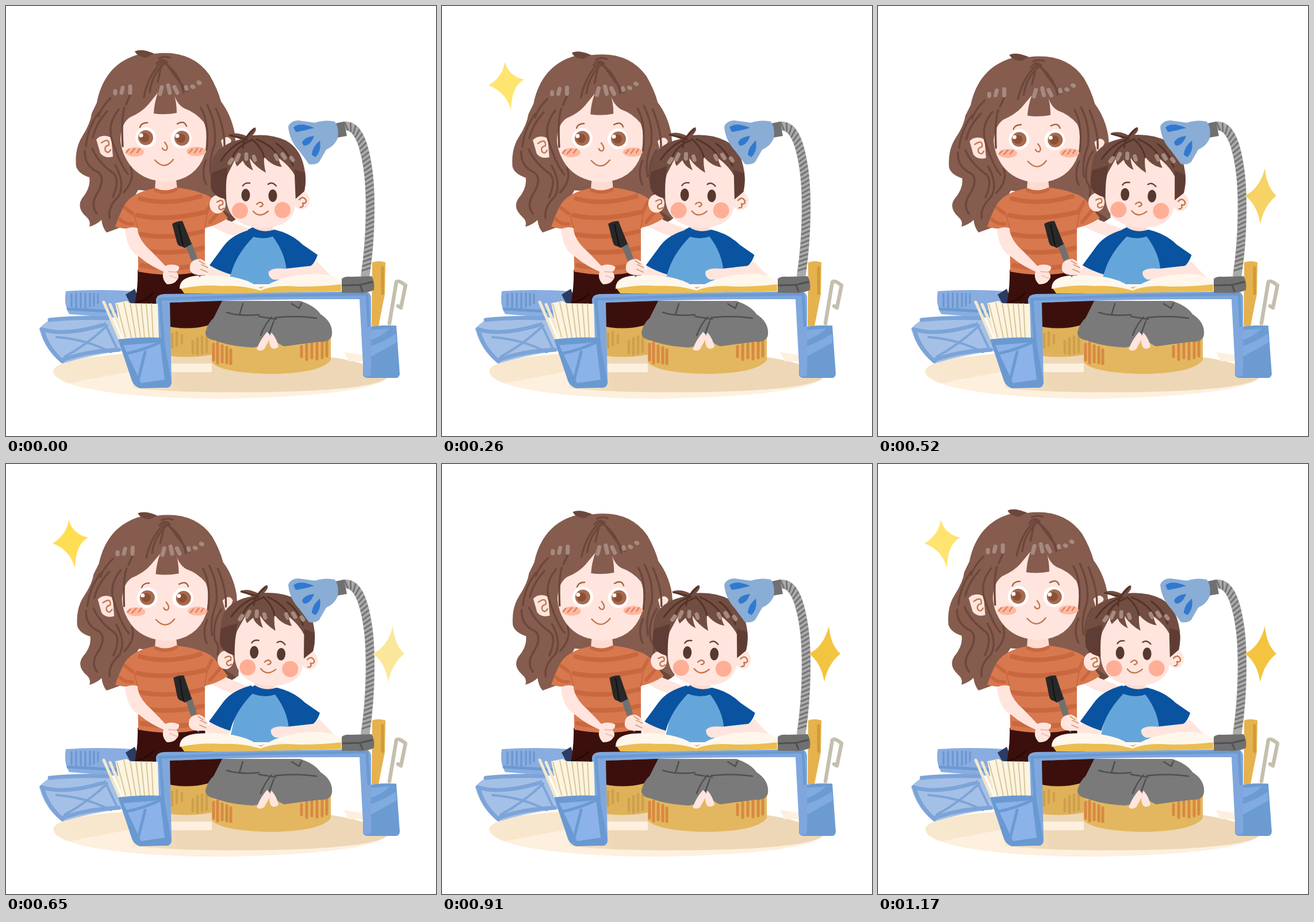
Recreate the animation shown at these times as an HTML page. Size 748x748 px, loop 1300 ms.

```html
<!DOCTYPE html>
<html lang="en">
<head>
<meta charset="utf-8">
<title>Homework together</title>
<style>
html, body { margin: 0; height: 100%; overflow: hidden; background: #fff; }
svg { display: block; width: 100vw; height: 100vh; }
.line { fill: none; stroke-linecap: round; stroke-linejoin: round; }
.hair { stroke: #6c473b; stroke-width: 3.4; }
.face { stroke: #c4764c; stroke-width: 2.4; }
.skin { fill: #ffe5de; }
.blue { stroke: #6b9ad1; stroke-width: 5; }
.bag { stroke: #7ca4d8; }
.shine { stroke: #a58a80; stroke-width: 7; }
</style>
</head>
<body>
<svg viewBox="0 0 748 748">
  <!-- floor -->
  <linearGradient id="sand">
    <stop offset="0" stop-color="#f8e8cf"/><stop offset=".25" stop-color="#f7e6cb"/><stop offset=".38" stop-color="#edd7b6"/>
  </linearGradient>
  <path fill="#fef0de" d="M82 636C86 612 190 600 350 600S650 615 661 648C640 672 480 683 360 683S84 668 82 636Z"/>
  <path fill="url(#sand)" d="M82 634C90 612 180 603 350 601S640 612 662 648C640 664 540 672 400 672C300 672 230 668 190 660L110 656Q84 648 82 634Z"/>
  <path fill="#fef0de" d="M286 622H358V637H288ZM110 656L215 636L222 664ZM588 602L621 607V618H596Z"/>

  <!-- right-hand stationery -->
  <path fill="#e6b24e" d="M637 446Q648 442 660 446L659 501L648 557H636Z"/>
  <path class="line" stroke="#cf9938" stroke-width="5" d="M655 455V500"/>
  <path class="line" stroke="#c4bfad" stroke-width="6.5" d="M667 552L679 480Q683 476 695 486L687 525L682 522"/>
  <path fill="#6c9bd2" d="M622 560Q650 554 679 556L685 640Q684 648 676 647H628Q620 646 621 638Z"/>
  <path fill="#80abe0" d="M627 564L668 561Q650 578 627 583ZM627 594Q655 586 678 570L680 585L627 614Z"/>

  <!-- books and bag -->
  <path fill="#89ade0" d="M104 496Q160 492 222 496L228 522L226 545L110 536Q100 520 104 496Z"/>
  <path class="line" stroke="#6a95d0" stroke-width="3" d="M114 501V522M122 500V525M130 500V524M138 500V526M146 500V523M153 500V521M160 501V517"/>
  <path class="line blue" d="M108 527L195 532"/>
  <path fill="#a5c0e6" d="M58 562Q62 555 76 546Q120 540 180 541L205 600Q150 606 98 622Q68 600 58 562Z"/>
  <path class="line bag" stroke-width="7" d="M62 562Q100 575 168 555M76 546Q120 541 178 543M98 616Q140 600 196 598M64 566Q72 595 98 618"/>
  <path class="line bag" stroke-width="4" d="M88 576Q140 580 182 602M176 556Q140 590 102 610M172 552L192 594"/>

  <!-- rear cushion -->
  <path fill="#dfb25a" d="M276 555H360V606Q320 614 280 608Z"/>
  <path class="line" stroke="#cf9f4c" stroke-width="4.5" d="M289 570V594M297 568V590M306 573V586M325 583V604M333 578V606M341 575V604M349 576V602"/>

  <!-- parent: hair mass and ears -->
  <g class="sway">
    <path fill="#855c4e" d="M224 79Q236 73 258 83Q322 75 354 120Q368 144 374 166Q392 190 398 222L406 300L404 368L392 376L345 330L230 320L222 334L202 384Q184 391 175 394Q168 386 166 372Q158 380 145 384Q148 374 140 367Q122 351 132 335Q148 316 145 298Q126 292 122 279Q119 248 133 226Q147 204 149 187L158 168C164 138 180 98 231 84Z"/>
    <path fill="#6c473b" d="M224 79Q236 74 257 83L244 90Q228 88 224 79ZM358 342L396 367L400 371L389 377Z"/>
    <path class="skin" d="M157 232Q168 221 183 229L186 262Q172 266 164 256Z"/>
    <path class="line face" d="M166 238Q180 228 179 242Q170 244 173 252Q178 258 182 250"/>
    <path class="skin" d="M374 234Q386 222 392 234L382 262Z"/>
    <path class="line hair" d="M161 186Q142 212 139 244M176 183Q156 205 151 229M196 180Q176 205 184 232Q198 276 212 292M182 160Q165 177 161 192M137 252Q136 278 160 289Q173 298 161 322Q145 345 158 361M190 277Q208 308 196 331Q177 349 180 369M217 281Q225 302 205 324M150 248Q160 272 188 292Q198 304 186 332M365 178Q381 215 380 245M350 172Q367 205 363 240Q352 270 357 296M372 250Q356 275 362 305Q371 315 367 330M348 268Q339 290 348 310"/>
  </g>

  <!-- parent: body -->
  <path fill="#2c3c62" d="M208 502L224 492L235 520L219 523Z"/>
  <path fill="#3b100c" d="M229 459L346 458L348 490L382 518Q374 546 350 556Q312 566 268 554L224 518Q230 488 229 459Z"/>
  <path class="line" stroke="#260806" stroke-width="2.5" d="M256 500Q243 513 226 516M300 506Q330 512 364 508"/>
  <path class="skin" d="M356 381L382 371Q406 381 432 391L414 403Q380 398 356 381Z"/>
  <path fill="#fddbd0" d="M261 292H295L298 320Q278 328 259 319Z"/>
  <path fill="#d8784e" d="M258 317Q276 325 297 316Q325 319 338 325Q358 330 367 344L386 369Q366 382 346 386V460Q290 474 230 462L229 386Q212 390 190 384Q200 355 209 342Q222 324 258 317Z"/>
  <path class="line" stroke="#c9683f" stroke-width="8" d="M233 335Q280 348 338 331M229 364Q275 375 345 359M234 397Q285 407 342 392M235 425Q290 434 342 421M236 451Q290 462 341 449"/>
  <path class="line" stroke="#c9683f" stroke-width="6" d="M207 351L220 361M198 371Q207 380 220 379M358 341L348 360M373 355L355 376M260 320Q278 328 296 319"/>
  <path class="line" stroke="#c9683f" stroke-width="2" d="M229 386L222 360M346 386L350 360"/>
  <path class="skin" d="M207 388Q218 383 228 386Q231 408 252 426Q266 440 277 452Q290 447 301 453Q302 460 296 462Q303 470 298 476Q292 485 280 484Q270 475 274 462Q250 452 230 435Q210 424 207 388Z"/>
  <path class="line" stroke="#efb9a6" stroke-width="1.8" d="M283 462L296 463M285 469L298 474"/>

  <!-- parent: face -->
  <g class="sway">
    <path class="skin" d="M199 232Q200 205 215 194Q236 185 247 172L264 151Q258 168 257 187Q276 190 297 186Q297 166 291 150Q297 171 310 178Q330 185 344 202Q353 222 346 257Q331 303 278 306Q225 303 206 260Q200 247 199 232Z"/>
    <path class="line hair" d="M272 97Q248 118 240 158M276 99Q253 120 250 150M272 97Q300 113 309 150M278 99Q301 132 315 148M262 101Q270 89 280 98M285 90Q275 86 266 91M270 104L264 132M206 177Q200 198 203 244M339 177Q354 204 349 250M218 150L209 171"/>
    <path class="line shine" d="M190 148V152M203 142L201 151M216 140V151M271 141L268 153M282 138L285 151M293 141L298 151M313 141L314 144M324 140L326 141M335 133L337 134"/>
    <circle cx="243" cy="229" r="18" fill="#fff"/><circle cx="305" cy="230" r="18" fill="#fff"/>
    <g fill="#a86a4d"><circle cx="243" cy="229" r="13"/><circle cx="306" cy="230" r="13"/></g>
    <g fill="#8a5139"><circle cx="241" cy="229" r="8"/><circle cx="304" cy="230" r="8"/></g>
    <g fill="#fff"><circle cx="235" cy="225" r="3.5"/><circle cx="298" cy="226" r="3.5"/></g>
    <g fill="#ffb89f"><ellipse cx="224" cy="254" rx="16" ry="8"/><ellipse cx="331" cy="253" rx="17" ry="8"/></g>
    <path class="line" stroke="#d77f60" stroke-width="2.2" d="M214 249L209 255M224 248L217 256M233 248L228 255M324 249L319 255M333 248L328 255M341 248L337 254"/>
    <path class="line" stroke="#a0603f" stroke-width="2.4" d="M233 211Q235 203 246 203M298 205Q310 198 314 209"/>
    <path class="line face" d="M276 237Q284 247 278 251Q273 251 272 247M259 268Q276 287 291 267"/>
  </g>

  <!-- front cushion and child's legs -->
  <path fill="#e3b75f" d="M357 565H565V616Q548 639 460 640Q374 638 358 620Z"/>
  <path class="line" stroke="#d88942" stroke-width="5" d="M361 588V616M368 586V621M376 591V619M384 594V621M391 598V622M514 592V610M523 589V615M532 586V612M541 584V614M550 580V612M558 580V609"/>
  <path fill="#7a7a7a" d="M376 513H512Q538 522 547 536Q569 550 567 572Q565 585 545 584L484 592Q473 588 463 578Q449 592 430 594Q390 592 364 582Q346 579 347 567Q352 550 361 543Z"/>
  <path class="line" stroke="#4f4f4f" stroke-width="2.5" d="M384 533Q405 540 440 537M412 518L406 537M462 541Q450 554 443 573M468 542Q505 538 540 543M466 548L458 569M497 518L510 526L514 517M470 545L440 540"/>
  <path class="skin" d="M436 597Q443 579 454 567Q460 570 459 579L449 597Q441 602 436 597ZM462 568Q472 580 474 593Q467 599 461 594Q454 580 462 568Z"/>

  <!-- child: trunk -->
  <g id="trunk">
    <path fill="#fddbd0" d="M428 372H464V394Q445 404 428 392Z"/>
    <path fill="#65a6da" d="M420 392Q446 402 466 392L488 425L491 484H384L394 440Z"/>
    <path fill="#0953a0" d="M421 389L429 385Q446 396 467 389Q497 396 516 415L542 433Q538 446 529 454L488 461Q486 430 464 401Q445 408 421 398Z"/>
    <path class="skin" d="M457 462Q464 455 485 457L530 452L541 444L562 466L573 476H465Q455 471 457 462Z"/>
    <g id="sleeve">
      <path class="skin" d="M350 465L358 448L392 464L388 476H350Z"/>
      <path fill="#0953a0" d="M428 388Q394 397 379 417L354 451Q371 461 391 467Q400 432 432 400Z"/>
    </g>
  </g>

  <!-- child: head -->
  <g id="head">
    <g class="skin"><ellipse cx="368" cy="345" rx="14" ry="16"/><ellipse cx="514" cy="338" rx="14" ry="16"/></g>
    <path class="line face" d="M367 341Q379 334 377 345Q368 347 371 353Q374 356 379 352M510 337Q517 329 522 338Q523 344 516 343M516 343Q519 350 512 350"/>
    <path fill="#724d41" d="M357 318Q354 284 361 263Q374 240 408 232L387 224Q400 218 418 226Q425 215 433 211Q438 215 429 225Q462 222 487 234Q511 247 518 278Q524 300 519 322L503 336L383 336Q362 332 357 318Z"/>
    <path fill="#603d34" d="M357 318Q355 302 358 290L385 280L383 336Q362 332 357 318ZM502 284L520 290Q522 308 519 322L503 336Z"/>
    <path class="skin" d="M383 330Q382 300 386 292L399 266Q398 274 402 279Q407 274 412 269Q416 280 430 286Q424 273 424 265Q434 280 452 290Q448 276 449 262Q462 278 480 280Q475 272 474 264Q494 279 502 294L504 340Q503 384 447 386Q384 384 383 330Z"/>
    <path class="line" stroke="#553329" stroke-width="3" d="M389 225L416 231M431 214L416 231M420 232Q393 240 374 269M426 234Q400 244 393 266M428 232Q445 246 449 263M436 232Q464 243 475 263M470 239Q490 252 499 277M414 234L412 247"/>
    <path class="line shine" stroke-width="6" d="M393 267L389 273M405 259L401 268M418 258V266M431 262L433 268M469 260L472 266M481 258L485 264M496 264L499 268"/>
    <g fill="#57392f"><ellipse cx="417" cy="329" rx="7.5" ry="11"/><ellipse cx="464" cy="330" rx="7.5" ry="11"/></g>
    <g fill="#ffae96"><circle cx="407" cy="356" r="14"/><circle cx="481" cy="355" r="14"/></g>
    <path class="line" stroke="#65443a" stroke-width="2.4" d="M412 313Q415 307 424 308M456 310Q463 305 470 313"/>
    <path class="line face" d="M436 345Q443 338 447 345Q446 349 442 349M430 357Q441 370 456 357"/>
  </g>

  <!-- table, open book -->
  <path fill="#ebbd52" d="M303 490Q330 478 442 489Q500 478 583 481V496Q500 499 310 500Z"/>
  <path fill="#fff7ec" d="M302 492Q301 472 332 469Q410 464 443 492Q483 465 545 466Q580 468 584 484Q530 490 490 487Q460 487 443 495Q410 485 375 487Q340 484 302 492Z"/>
  <path class="line" stroke="#4c78bb" stroke-width="3" d="M300 514L380 511"/>
  <path fill="#7fa7dd" d="M261 510Q262 502 275 501L440 499L622 496Q635 497 635 508V640Q632 648 622 643L615 510Q440 509 285 516L288 655Q287 666 275 664H230L262 580Z"/>
  <path class="line blue" d="M267 510L440 504L628 501L631 556M268 514L279 655"/>

  <!-- pencil box -->
  <path class="line" stroke="#f3e8cd" stroke-width="5" d="M170 515L198 580M181 519L207 580"/>
  <path fill="#fcf4df" d="M190 517L210 513L216 517L264 518L266 580H203Z"/>
  <path class="line" stroke="#d9c69b" stroke-width="2" d="M193 519L208 576M205 516L218 577M216 517L226 577M226 518L234 577M235 518L241 577M244 518L249 577M253 518L256 577"/>
  <path fill="#6a99d2" d="M195 580Q230 575 274 577L288 655Q287 665 275 664L233 665Q223 662 219 652Z"/>
  <path fill="#8bb2e9" d="M204 590L268 585L276 650L235 656Z"/>
  <path class="line blue" d="M206 605Q235 600 268 585M242 602L230 650"/>

  <!-- pen and hand -->
  <g id="pen">
    <path fill="#707070" d="M312 416L323 412L333 439L323 444Z"/>
    <path class="line" stroke="#707070" stroke-width="3" d="M332 445L337 470"/>
    <path fill="#282828" d="M289 379Q297 374 307 374L323 414L311 421L305 418Q299 418 297 410Z"/>
    <path class="line" stroke="#111" stroke-width="2" d="M300 380L308 417"/>
  </g>
  <g id="hand">
    <path class="skin" d="M320 453Q321 441 338 440Q350 444 352 456L358 468H334Q318 466 320 453Z"/>
    <path class="line" stroke="#d49c6d" stroke-width="1.8" d="M336 443L345 449M340 450L351 455M339 458L350 463"/>
  </g>

  <!-- lamp -->
  <g id="neck">
    <path class="line" stroke="#aaa" stroke-width="15.5" d="M588 209C613 206 623 242 629 280S636 395 625 468"/>
  </g>
  <path fill="#707070" d="M574 204L588 201L593 226L576 229Z"/>
  <path fill="#89add5" d="M491 210Q494 200 508 199L537 203Q556 197 572 201Q580 212 577 230Q572 243 557 250Q550 262 545 271Q538 277 527 275L510 252Q493 234 491 210Z"/>
  <path fill="#3179d0" d="M500 211Q511 201 536 212Q520 217 504 219ZM515 238Q518 228 536 226Q530 243 518 243ZM532 259Q532 246 546 234Q549 253 538 263Z"/>
  <path fill="#707070" d="M584 475Q588 470 600 471L636 470Q642 480 640 494Q625 501 610 499H584Z"/>
  <path class="line" stroke="#505050" stroke-width="3" d="M586 486L616 485L637 480M616 486L620 496"/>

  <path id="starL" d="M109 97Q116 122 143 128Q121 139 120 181Q111 149 81 138Q106 123 109 97Z"/>
  <path id="starR" d="M673 282Q676 315 693 330Q671 348 665 379Q659 344 638 330Q664 318 673 282Z"/>
</svg>
<script>
const $ = id => document.getElementById(id);
const STEP = 130;
const lean = [0, .17, .35, .66, .86, 1, .74, .66, .46, .28];
const glowL = [0, .4, .75, .1, 0, 1, .25, 0, .4, .75];
const glowR = [0, 0, 0, 1, .7, .3, 0, 1, 1, 1];
const move = (id, value) => $(id).setAttribute('transform', value);

// slanted rings along the lamp's neck
const tube = $('neck').firstElementChild;
const length = tube.getTotalLength();
let rings = '';
for (let s = 4; s < length - 4; s += 8) {
  const a = tube.getPointAtLength(s - 3), b = tube.getPointAtLength(s + 3);
  const dx = (b.x - a.x) / 6, dy = (b.y - a.y) / 6;
  const x = (a.x + b.x) / 2, y = (a.y + b.y) / 2;
  const ox = dy * 6 - dx * 3, oy = -dx * 6 - dy * 3;
  rings += `M${x - ox} ${y - oy}L${x + ox} ${y + oy}`;
}
$('neck').insertAdjacentHTML('beforeend', `<path class="line" stroke="#747474" stroke-width="3" d="${rings}"/>`);

// a star pales to cream before it goes out
function shine(id, rgb, glow) {
  const cream = [255, 246, 192];
  $(id).setAttribute('visibility', glow ? 'visible' : 'hidden');
  $(id).setAttribute('fill', `rgb(${rgb.map((c, i) => Math.round(cream[i] + (c - cream[i]) * glow))})`);
}

function draw(now) {
  const k = Math.floor(now / STEP) % lean.length;
  const w = lean[k], up = k % 2;
  // the parent's head sinks and leans, anchored at the shoulders
  const skew = .017 * w, squash = .022 * w;
  for (const g of document.querySelectorAll('.sway'))
    g.setAttribute('transform', `matrix(1 0 ${-skew} ${1 - squash} ${390 * skew} ${390 * squash})`);
  move('head', `translate(${11 * w} ${-w}) rotate(${3 * w} 430 400)`);
  move('trunk', `translate(${4 * w} 0)`);
  move('sleeve', `translate(${-3 * up - 2 * w} ${-3 * up})`);
  move('pen', `translate(${-up} ${-5 * up}) rotate(${3 * up} 330 440)`);
  move('hand', `translate(${-2 * up} ${-4 * up})`);
  shine('starL', [255, 222, 84], glowL[k]);
  shine('starR', [243, 196, 64], glowR[k]);
  requestAnimationFrame(draw);
}
draw(performance.now());
</script>
</body>
</html>
```
